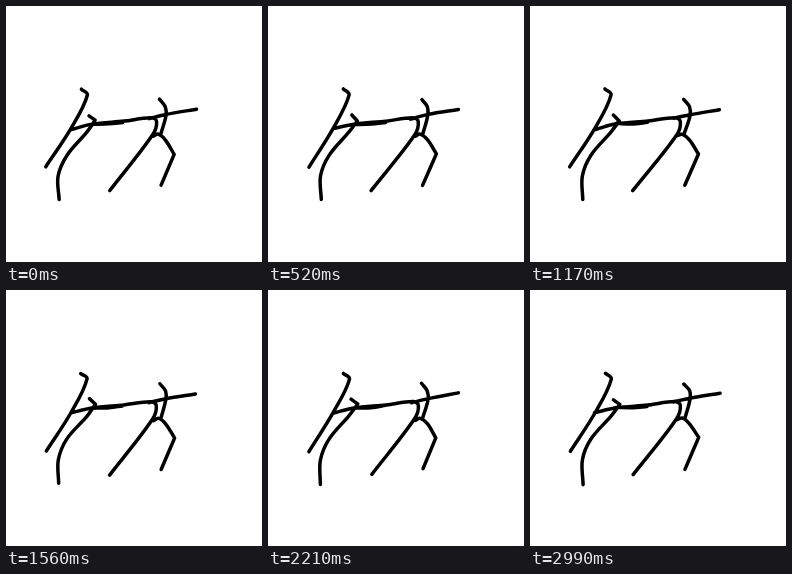
These frames come from a looping animation (256 by 256 pixels, 3.12 s). An HTML page:

```html
<!DOCTYPE html>
<html lang="en">
<head>
<meta charset="utf-8">
<title>Wobbling line sketch</title>
<style>
  html, body { margin: 0; width: 100%; height: 100%; overflow: hidden; background: #fff; }
  svg { display: block; width: 100%; height: 100%; }
  path { fill: none; stroke: #000; stroke-width: 3.5; stroke-linecap: round; stroke-linejoin: round; }
</style>
</head>
<body>
<svg viewBox="0 0 256 256"><path id="ink"/></svg>
<script>
const STEP = 130, STEPS = 24;
const TIP_WOBBLE = 1.4, BODY_WOBBLE = 0.5;

const tip = [190, 103.5], knee = [168.3, 148];
const STROKES = [
  [[75.3, 83], [81.3, 89], [65, 122.5], [40.3, 161.5]],                 // front arm
  [[83.5, 109.3], [89.5, 114.5]],                                       // shoulder
  [[89.5, 114.5], [81, 126], [61, 149], [52.3, 170], [52.8, 194]],      // front leg
  [[65, 123], [86, 118], [118, 115], [145, 111.8], [150.5, 115.5], [146.5, 129], [103.3, 185]], // back and hind leg
  [[86, 118], [103, 117.8], [117, 116]],                                // belly
  [[143, 112.5], [160, 108.5], tip],                                    // tail
  [[153.3, 93.6], [159.5, 101], [159.8, 110], [154.7, 127.5]],          // rump
  [[147, 130], [152.5, 128.3], [159.5, 134], knee],                     // thigh
  [knee, [155.2, 179]]                                                  // shin
];

const noise = n => {
  const s = Math.sin(n * 12.9898) * 43758.5453;
  return s - Math.floor(s) - 0.5;
};

// Equal points get equal wobble, so shared joints stay closed
const wobble = (step, p, size) =>
  p.map((v, k) => v + size * noise(p[0] + p[1] * 3 + k * 7 + step * 31));

const wobbleStroke = (step, pts) => pts.map((p, i) =>
  wobble(step, p, i === 0 || i === pts.length - 1 ? TIP_WOBBLE : BODY_WOBBLE));

// Catmull-Rom spline through the points
function curve(pts) {
  let d = `M${pts[0]}`;
  for (let i = 0; i < pts.length - 1; i++) {
    const a = pts[i], b = pts[i + 1];
    const before = pts[i - 1] || a, after = pts[i + 2] || b;
    // Handles shrink with the segment, so tight bends do not overshoot
    const len = (p, q) => Math.hypot(q[0] - p[0], q[1] - p[1]) || 1;
    const near = len(a, b) / 3;
    const c1 = a.map((v, k) => v + (b[k] - before[k]) / len(before, b) * near);
    const c2 = b.map((v, k) => v - (after[k] - a[k]) / len(a, after) * near);
    d += `C${c1} ${c2} ${b}`;
  }
  return d;
}

const ink = document.getElementById('ink');
let shown = -1;

function draw() {
  const step = Math.floor(performance.now() / STEP) % STEPS;
  if (step !== shown) {
    shown = step;
    ink.setAttribute('d', STROKES.map(s => curve(wobbleStroke(step, s))).join(''));
  }
  requestAnimationFrame(draw);
}
draw();
</script>
</body>
</html>
```
